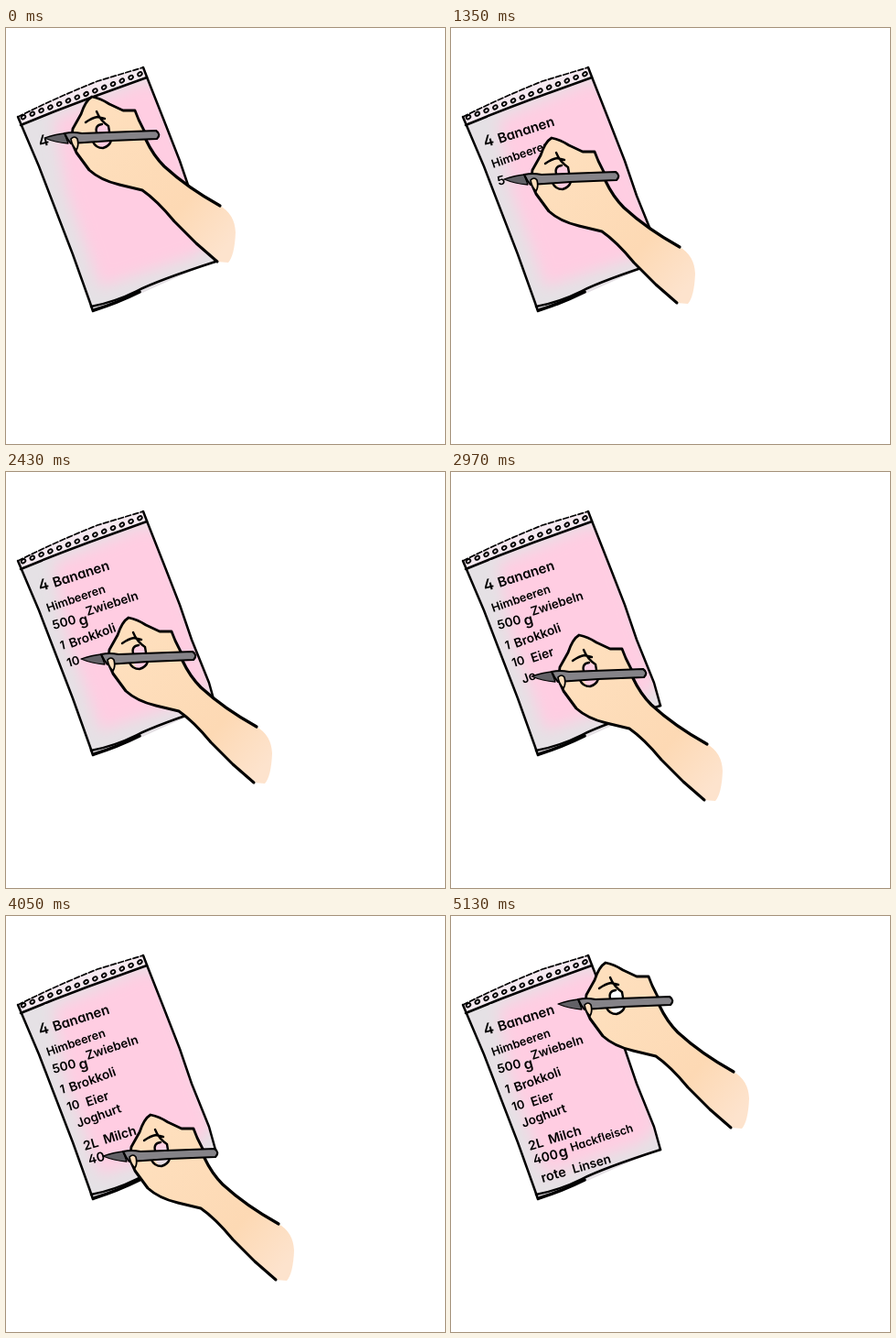
Write an HTML page that moves like this. It is 480 px wide and 454 px high and loops after 5400 ms.

```html
<!DOCTYPE html>
<html lang="de">
<head>
<meta charset="utf-8">
<title>Einkaufszettel</title>
<style>
  html, body { margin: 0; width: 100%; height: 100%; overflow: hidden; background: #fff; }
  svg { display: block; width: 100%; height: 100%; }
  text { font-family: Inter, "Open Sans", sans-serif; font-weight: 600; font-feature-settings: "cv02", "cv11"; }
  .ink { fill: none; stroke: #000; stroke-width: 2.8; stroke-linecap: round; stroke-linejoin: round; }
</style>
</head>
<body>
<svg viewBox="0 0 480 454">
  <defs>
    <path id="sheet" d="M13 97Q55 75 100 58L150 43L155 56L172 99L190 145L203 183L222 230L229 255Q190 270 147 290L95 310L92 300L73 247L51 190L36 151Z"/>
    <clipPath id="sheetClip"><use href="#sheet"/></clipPath>
    <filter id="soft" x="-20%" y="-20%" width="140%" height="140%"><feGaussianBlur stdDeviation="8"/></filter>
    <linearGradient id="skin" gradientUnits="userSpaceOnUse" x1="180" y1="80" x2="325" y2="205">
      <stop offset="0" stop-color="#fedfbd"/>
      <stop offset=".65" stop-color="#fdd9b4"/>
      <stop offset="1" stop-color="#fde3cd"/>
    </linearGradient>
  </defs>

  <use href="#sheet" fill="#e5e1e5"/>
  <g clip-path="url(#sheetClip)">
    <path d="M52 100L150 58L172 65L200 150L226 230L208 248L103 283L88 240L66 180Z" fill="#ffcde2" filter="url(#soft)"/>
    <path d="M10 97Q55 73 100 55L150 40L155 54L90 77L16 106Z" fill="#f5e9f0"/>
  </g>
  <g class="ink">
    <path d="M13 97Q55 76 100 58L150 43" stroke-width="1.7" stroke-dasharray="6 2.5"/>
    <path d="M16 106Q52 91 90 77L154 54M13 97L36 151L51 190L73 247L92 300L95 309" stroke-width="2.5"/>
    <path d="M150 43L155 56L172 99L190 145L203 183L222 230L229 255" stroke-width="2.5"/>
    <path d="M93 304Q119 299 143 287T229 255" stroke-width="2.5"/>
    <path d="M96 308Q122 300 146 288" stroke-width="3.6"/>
    <g id="holes" stroke-width="1.8"></g>
  </g>
  <g id="list"></g>

  <g id="hand">
    <path fill="url(#skin)" fill-rule="evenodd" d="M146 99L148 86L157 70Q162 55 169 51Q179 53 188 59L203 66L216 66L220 76L227 90L229 99Q236 115 248 127Q273 150 309 170Q325 179 326 199Q325 224 318 232L306 231L283 211L259 187Q240 164 224 153L199 147Q178 142 166 131L152 112ZM173 94Q172 81 182 81Q190 86 190 95Q188 107 180 107Q174 104 173 94Z"/>
    <g class="ink">
      <path d="M147 94L148 86L157 70Q162 55 169 51Q179 53 188 59L203 66L216 66L220 76L227 90"/>
      <path d="M228 98Q236 115 248 127Q273 150 309 170" stroke-width="3.2"/>
      <path d="M306 231L283 211L259 187Q240 164 224 153L199 147Q178 142 166 131L152 112L147 101" stroke-width="3"/>
      <path d="M162 79Q169 74 175 73L183 75M174 67Q178 77 187 83L188 89M174 90Q172 82 180 81M170 100Q173 107 181 107Q188 105 190 99" stroke-width="2.4"/>
      <path d="M117 96Q129 92 139 91L143 102Q129 101 117 96Z" fill="#626166" stroke-width="1.3"/>
      <path d="M139 91Q148 89 158 91L239 88Q245 92 240 97L190 99L146 102Q142 98 139 91Z" fill="#858388" stroke-width="2.2"/>
      <path d="M146 97Q150 93 153 97Q155 104 152 109Q147 104 146 97Z" fill="#fedfbd" stroke-width="1.7"/>
    </g>
  </g>
</svg>
<script>
const STEP = 270;
const PEN_HOME = [117, 96];

// x, baseline y, angle, size, text
const words = [
  [37, 130, -14, 17, "4"], [53, 126, -18, 14.8, "Bananen"],
  [46, 153, -19, 12.7, "Himbeeren"],
  [52, 172, -15, 13.6, "500"], [81, 168, -15, 16, "g"], [89, 157, -18, 13.4, "Zwiebeln"],
  [60, 194, -12, 13, "1"], [71, 192, -20, 13.7, "Brokkoli"],
  [68, 213, -16, 13, "10"], [89, 208, -18, 13.8, "Eier"],
  [79, 231, -20, 13.4, "Joghurt"],
  [86, 256, -16, 14, "2L"], [108, 249, -17, 14, "Milch"],
  [91, 271, -14, 14, "400"], [119, 264, -15, 16, "g"], [132, 257, -18, 12.4, "Hackfleisch"],
  [100, 291, -16, 14.5, "rote"], [134, 281, -16, 13.6, "Linsen"]
];

// pen tip x, y and letters written, one entry per step
const poses = [
  [42, 120, 1], [82, 111, 4], [118, 96, 8], [51, 144, 10], [91, 134, 14],
  [58, 165, 18], [146, 141, 29], [85, 184, 32], [126, 172, 38], [82, 204, 40],
  [115, 197, 44], [88, 223, 46], [127, 212, 51], [91, 249, 52], [135, 238, 58],
  [106, 262, 60], [186, 236, 73], [126, 277, 77], [117, 96, 83], [117, 96, 83]
];

function add(parent, tag, attributes) {
  const node = document.createElementNS("http://www.w3.org/2000/svg", tag);
  for (const name in attributes) node.setAttribute(name, attributes[name]);
  return parent.appendChild(node);
}

const holes = document.getElementById("holes");
for (let i = 0; i < 14; i++) {
  const x = 19 + 9.8 * i, y = 97.3 - 3.62 * i;
  add(holes, "ellipse", { cx: x, cy: y, rx: 2.5, ry: 1.9, transform: `rotate(-35 ${x} ${y})` });
}

const list = document.getElementById("list");
const lines = words.map(([x, y, angle, size, text]) => ({
  text,
  node: add(list, "text", { transform: `translate(${x} ${y}) rotate(${angle})`, "font-size": size })
}));

const hand = document.getElementById("hand");
let shown = -1;

function draw(now) {
  const step = Math.floor(now / STEP) % poses.length;
  if (step !== shown) {
    shown = step;
    const [x, y, letters] = poses[step];
    hand.setAttribute("transform", `translate(${x - PEN_HOME[0]} ${y - PEN_HOME[1]})`);
    let left = letters;
    for (const { text, node } of lines) {
      node.textContent = text.slice(0, Math.max(0, left));
      left -= text.length;
    }
  }
  requestAnimationFrame(draw);
}
draw(performance.now());
</script>
</body>
</html>
```
